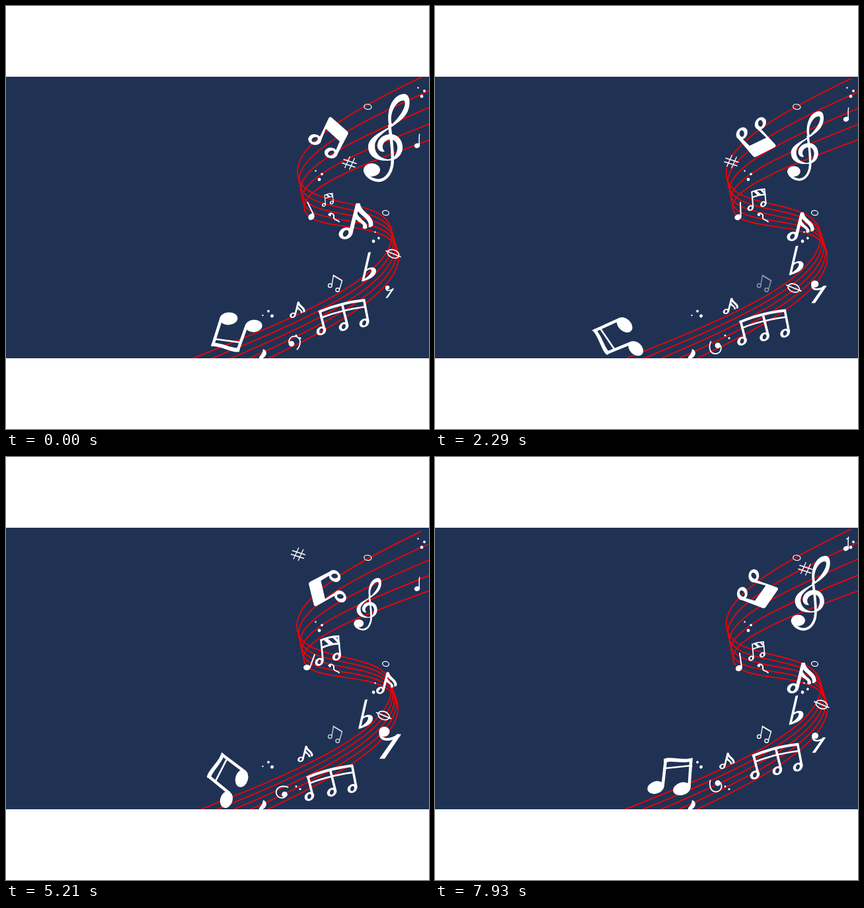
These frames come from a looping animation (640 by 640 pixels, 8000 ms). An HTML page:

```html
<!DOCTYPE html>
<html lang="en">
<head>
<meta charset="utf-8">
<title>Music staff</title>
<style>
  html, body { margin: 0; height: 100%; overflow: hidden; background: #fff; }
  body > svg { display: block; width: 100%; height: 100%; }
  .ink { fill: #fff; stroke: none; }
  .pen { fill: none; stroke: #fff; }
  #staff { fill: none; stroke: #fa0000; stroke-width: 1.7; }
</style>
</head>
<body>
<svg viewBox="0 0 640 640">
  <defs>
    <path id="head" fill-rule="evenodd" d="M-10,0a10,8 0 1 0 20,0a10,8 0 1 0 -20,0z
      M-4.1,2.9a5,3.5 -35 1 0 8.2,-5.8a5,3.5 -35 1 0 -8.2,5.8z"/>
    <g id="flagged" class="ink">
      <use href="#head" transform="translate(-15.5 18.5) rotate(-22) scale(1.08)"/>
      <path d="M-11,17L0,-27L6,-27C8,-13 26,-10 26,5C26,8 21,10 19,9C22,-2 8,-8 3,-15L-5,18Z"/>
      <path d="M1,-14C5,-1 18,0 17,10C15,12 12,12 10,10C14,4 3,2 -1,-4Z"/>
    </g>
    <g id="dots" class="ink">
      <circle r="1.2"/><circle cx="9.500" cy="4.800" r="1.900"/><circle cx="5.500" cy="13" r="2.400"/>
    </g>
  </defs>

  <svg x="0" y="107" width="640" height="426" viewBox="0 107 640 426">
    <rect y="107" width="640" height="426" fill="#203254"/>
    <g id="staff"></g>

    <use href="#dots" x="623.5" y="123.7"/>
    <use href="#dots" x="468.5" y="249.5"/>
    <use href="#dots" transform="translate(558.5 342) rotate(33)"/>
    <use href="#dots" transform="translate(388.5 468) rotate(-63)"/>
    <g class="ink">
      <circle cx="439" cy="498.5" r="1.4"/><circle cx="445" cy="502.5" r="1.6"/>
      <path d="M389,519C396,521 396,531 386,534L383,534C382,529 388,529 389,519Z"/>
      <circle cx="490" cy="316" r="2"/>
    </g>
    <g class="pen" stroke-width="1.3">
      <ellipse cx="547.3" cy="152.5" rx="5.6" ry="3.9" transform="rotate(10 547.3 152.5)"/>
      <ellipse cx="574.5" cy="313" rx="5" ry="3.6" transform="rotate(10 574.5 313)"/>
      <path stroke-width="2" d="M488,316C491,311 497,315 496,319C495,325 501,322 504.5,327"/>
    </g>
    <g id="faded" class="pen" stroke-width="1.4">
      <path d="M493,422L495.5,407.5L508.5,415.5L504.5,429"/>
      <path stroke-width="2" d="M495,407.5L508.5,415.5"/>
      <circle cx="490.3" cy="423" r="2.8"/><circle cx="501.7" cy="429.5" r="2.8"/>
    </g>

    <g id="treble" class="ink">
      <path fill-rule="evenodd" d="M4,-17C-2,-40 8,-66 26,-67C37,-67 36,-48 31,-39C22,-20 -18,-8 -18,12C-18,24 -8,31 2,32L2,34
        C-14,35 -28,28 -28,13C-28,0 -12,-8 4,-17Z M8,-21C3,-36 14,-57 25,-57C31,-57 28,-40 8,-21Z"/>
      <path d="M2,34C18,34 25,22 24,12C23,0 14,-7 4,-6C-8,-5 -15,4 -14,13C-13,19 -7,22 -3,20C-9,14 -6,4 4,2C14,1 17,10 16,16C15,26 10,31 2,32Z"/>
      <path class="pen" stroke-width="4.5" d="M4,-20C6,-5 11,25 8,42C5,57 -4,64 -13,64C-24,63 -32,56 -33,48"/>
      <ellipse cx="-22.5" cy="48" rx="12.5" ry="10"/>
    </g>

    <g id="thick" class="ink">
      <use href="#head" transform="translate(-16 16) rotate(-25)"/>
      <use href="#head" transform="translate(16 18) rotate(-25)"/>
      <path d="M-18,-23Q-18,-26 -15,-26L17,-23Q20,-22 20,-19L25,15L21,17L16,-4L-12,-7L-7,13L-11,15Z"/>
    </g>

    <g id="hatched" class="ink">
      <use href="#head" transform="translate(-13.5 16.5) rotate(-35) scale(.7)"/>
      <use href="#head" transform="translate(13 8.5) rotate(-35) scale(.7)"/>
      <path class="pen" stroke-width="2.6" d="M-8,15L-11,-17M18.5,7L15.5,-22"/>
      <path class="pen" stroke-width="3" d="M-12,-16Q0,-22 17,-22.5M-10,-5Q2,-11 18,-11.5"/>
      <path d="M-8,-18L-2,-20L9,-11L2,-9ZM6,-21L11,-22L17,-15L16,-11Z"/>
    </g>

    <use id="bigFlag" href="#flagged"/>
    <use id="smallFlag" href="#flagged"/>

    <g id="flat" class="ink">
      <path d="M-1,-22L3,-23L-7,20L-11,22Z"/>
      <path d="M-7,7C-2,-1 11,-2 11,6C11,14 0,19 -10,22L-7,18C0,14 4,9 4,5C3,2 -3,4 -7,10Z"/>
    </g>

    <g id="whole" class="pen" stroke-width="1.7">
      <ellipse rx="9" ry="6"/><path d="M-12.5,0H12.5"/>
    </g>

    <g id="rest" class="ink">
      <ellipse cx="-8.5" cy="-17" rx="8" ry="7.5"/>
      <path class="pen" stroke-width="4" d="M-14.5,-15C-14,-1 2,-4 14,-12"/>
      <path d="M10,-13L17,-13L-8,24L-16,24Z"/>
    </g>

    <g id="triple" class="ink">
      <use href="#head" transform="translate(-33 20.5) rotate(-35) scale(.78)"/>
      <use href="#head" transform="translate(1 14) rotate(-35) scale(.78)"/>
      <use href="#head" transform="translate(32 8.5) rotate(-35) scale(.78)"/>
      <path class="pen" stroke-width="3.6" d="M-28,19L-35,-9M6.5,12L-1,-18M38,7L31.5,-27"/>
      <path class="pen" stroke-width="4" d="M-37,-8Q-4,-22 33,-26"/>
      <path class="pen" stroke-width="2.6" d="M-34,1Q-4,-11 34,-16"/>
    </g>

    <g id="beamed" class="ink">
      <ellipse cx="-22" cy="17" rx="12.8" ry="9.3" transform="rotate(-18 -22 17)"/>
      <ellipse cx="17.5" cy="19" rx="13.5" ry="9.5" transform="rotate(-18 17.5 19)"/>
      <path class="pen" stroke-width="4.5" d="M-11.5,16L-7,-25M28.5,17L31.5,-26"/>
      <path d="M-10,-26C0,-31 20,-23 34,-28L33.5,-23C20,-18 2,-25 -9,-20Z"/>
      <path class="pen" stroke-width="2.6" d="M-8,-12L31,-16"/>
    </g>

    <g id="bass" class="ink">
      <circle cx="-5" cy="3" r="4.3"/>
      <path class="pen" stroke-width="1.8" d="M-9,2C-10,-12 8,-11 8,0C8,5 6,9 3,12"/>
    </g>

    <g id="sharp" class="pen">
      <path stroke-width="1.3" d="M-7,7.500L1,-10M0,10L8,-7.500"/>
      <path stroke-width="1.700" d="M-9,-5.500L11,1M-11,0L9,6.500"/>
    </g>

    <g id="highQuarter" class="ink">
      <ellipse cx="-.5" rx="4.3" ry="3.5" transform="rotate(-25)"/>
      <path class="pen" stroke-width="1.5" d="M2.8,-1C2.5,-8 2.5,-13 3.2,-17.5"/>
    </g>

    <g id="lowQuarter" class="ink">
      <ellipse cx="-1" cy="10.5" rx="5.3" ry="4.3" transform="rotate(-25 -1 10.5)"/>
      <path class="pen" stroke-width="2" d="M3.3,10L3,-12.5"/>
    </g>
  </svg>
</svg>

<script>
const PERIOD = 8, FPS = 14;
const LATE = [0, 4.8, PERIOD], EARLY = [0, 2.3, PERIOD], TWICE = [0, 2.4, 4.7, PERIOD];
const byId = id => document.getElementById(id);
const mix = (a, b, k) => a.map((v, i) => v + (b[i] - v) * k);

// Moves evenly from pose to pose; the last leg slows down when ease > 1
const travel = (beats, ease, ...poses) => t => {
  const leg = beats.findIndex(beat => beat > t) - 1;
  const u = (t - beats[leg]) / (beats[leg + 1] - beats[leg]);
  const k = leg === poses.length - 2 ? 1 - (1 - u) ** ease : u;
  return mix(poses[leg], poses[leg + 1], k);
};

// Poses are x, y, rotation, scale
const sharpAngle = travel([0, 2.9, PERIOD], 1.15, [66], [133], [338]);
const beamedPlace = travel(EARLY, 1.6, [349.5, 495.5], [278, 507], [356, 483]);
const parts = {
  treble: travel(LATE, 1, [576, 200, 0, 1], [544, 225.5, 0, .56], [569, 206, 0, .855]),
  thick: travel(LATE, 1, [489.5, 198.5, 36], [485, 201, 271], [488.5, 201.5, 116]),
  hatched: travel(LATE, 1, [487, 293.5, 0, .45], [487.5, 293.5, 0, 1.045], [487, 294, 0, .63]),
  bigFlag: travel(LATE, 1, [529.5, 325.5, 0, 1], [579, 343, 0, .57], [554, 334, 0, .855]),
  smallFlag: travel(LATE, 1, [441, 459.5, 0, .45], [454.5, 447.5, 0, .45], [441.5, 460, 0, .45]),
  rest: travel(LATE, 1, [580.5, 432.5, 0, .39], [581, 432.5, 0, 1.06], [580.5, 432.5, 0, .62]),
  lowQuarter: travel(LATE, 1, [458.5, 309, -25], [460, 309, 25], [459.5, 309, -8]),
  triple: travel(LATE, 2, [510, 471], [484, 503.5], [517, 460.5]),
  whole: travel(EARLY, 1.6, [586, 375, 22], [542.5, 427, 22], [585, 374.5, 22]),
  flat: travel(TWICE, 2, [549, 395], [546.5, 385], [543, 392], [546.5, 383.5]),
  highQuarter: travel(TWICE, 1.6, [622.5, 211], [622.5, 169], [622.5, 218], [622.5, 138]),
  beamed: t => [...beamedPlace(t), 21 * t - 166.5],
  bass: t => [437 - 20 * Math.sin(t / 3.2), 508 + 10 * Math.sin(t / 1.6), 250 * Math.sin(t / 3.2)],
  sharp: t => {
    const a = sharpAngle(t) * Math.PI / 180;
    return [487 + 80 * Math.cos(a), 190 + 52 * Math.sin(a)];
  },
};
const fade = travel(EARLY, 1, [1], [.5], [1]);
const drift = travel(LATE, 1, [0], [1], [.35]);

// The five staff lines blend between the two outer curves
const upper = [630, 107, 530, 155, 441, 205, 441, 250, 441, 313, 584, 282, 584, 346, 584, 419, 398, 487, 268, 539];
const lower = [670, 192, 570, 228, 451, 270, 451, 303, 451, 350, 594, 315, 594, 380, 594, 435, 480, 495, 384, 539];
const lines = [0, .25, .5, .75, 1].map(k => {
  const p = mix(upper, lower, k);
  const line = document.createElementNS(byId('staff').namespaceURI, 'path');
  line.setAttribute('d', `M${p.slice(0, 2)}C${p.slice(2)}`);
  return byId('staff').appendChild(line);
});

function draw(t) {
  for (const id in parts) {
    const [x, y, angle = 0, scale = 1] = parts[id](t);
    byId(id).setAttribute('transform', `translate(${x} ${y}) rotate(${angle}) scale(${scale})`);
  }
  const [shift] = drift(t);
  lines.forEach((line, i) =>
    line.setAttribute('transform', `translate(${-shift} ${5.6 * shift * (1 - i / 4)})`));
  byId('faded').setAttribute('opacity', fade(t)[0]);
}

const start = performance.now();
function tick() {
  const t = Math.max(0, performance.now() - start) / 1000 % PERIOD;
  draw(Math.min(Math.floor(t * FPS + .05), PERIOD * FPS - 1) / FPS);
  requestAnimationFrame(tick);
}
tick();
</script>
</body>
</html>
```
